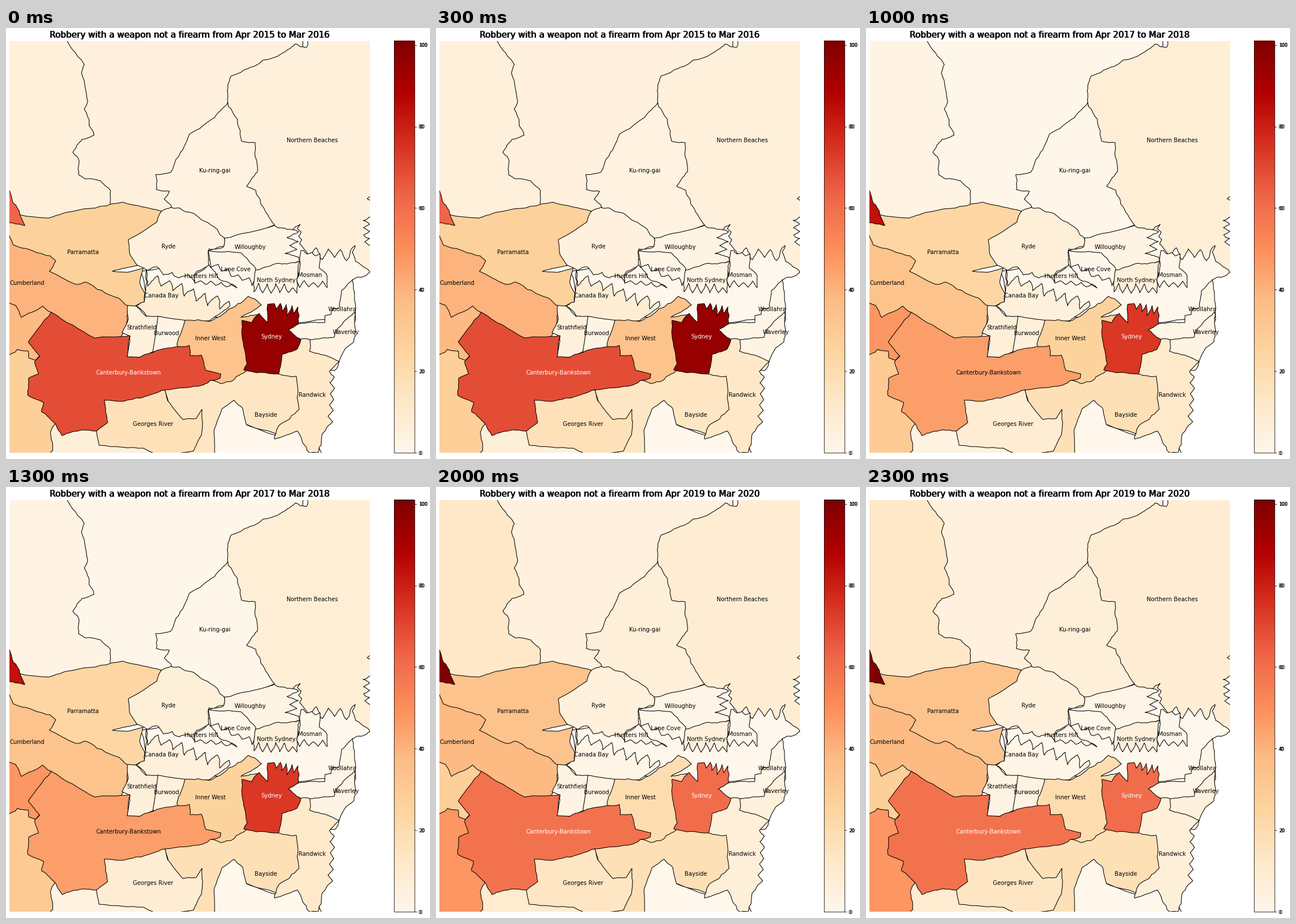
These frames come from a looping animation (742x755 px, 2500 ms). A matplotlib script:

```python
import matplotlib.pyplot as plt
import numpy as np
from matplotlib.animation import FuncAnimation
from matplotlib.patches import Polygon, Rectangle

W, H, DPI = 742, 755, 100
PX = 72 / DPI  # points per pixel
LEFT, TOP, RIGHT, BOTTOM = 6, 22.5, 637, 744
BAR_LEFT, BAR_RIGHT = 678.5, 714.5
VMAX = 101
CMAP = plt.get_cmap("OrRd")

plt.rcParams["font.family"] = "DejaVu Sans"
rng = np.random.default_rng(4)
fig = plt.figure(figsize=(W / DPI, H / DPI), dpi=DPI, facecolor="white")
ax = fig.add_axes([0, 0, 1, 1])
ax.axis("off")
map_box = Rectangle((LEFT, TOP), RIGHT - LEFT, BOTTOM - TOP, fc="none", ec="none")
ax.add_patch(map_box)
regions = []


def bays(start, end, count, depth):
    """Shoreline between two points, cut by inlets of random depth."""
    a, b = np.array(start, float), np.array(end, float)
    along = b - a
    across = np.array([-along[1], along[0]]) / np.hypot(*along)
    shore = []
    for k in range(2 * count + 1):
        inward = depth * (rng.uniform(0.6, 1) if k % 2 else rng.uniform(0, 0.2))
        shore.append(a + along * k / (2 * count) + across * inward)
    return shore


def roughen(points, amount, rounds=3):
    """Shift the midpoints of the sides again and again, as on a coast."""
    for _ in range(rounds):
        out = []
        for a, b in zip(points, np.roll(points, -1, axis=0)):
            out.append(a)
            length = np.hypot(*(b - a))
            if length > 6:
                shift = rng.normal(0, amount * min(length, 20), 2)
                out.append((a + b) / 2 + shift)
        points = np.array(out)
    return points


def region(values, outline, name=None, at=None, rough=0.06):
    """Add an area; later areas cover the loose edges of earlier ones."""
    points = roughen(np.array(outline, float), rough)
    patch = Polygon(points, ec="black", lw=1.05 * PX, joinstyle="round")
    ax.add_patch(patch)
    patch.set_clip_path(map_box)
    label = None
    if name:
        label = ax.text(at[0], at[1] + 1, name, size=10 * PX, ha="center", va="center")
    regions.append((values, patch, label))


EMPTY = (0,) * 5

# North
region((5, 3, 1, 6, 5), [(100, 10), (520, 10), (520, 330), (100, 330)])
region((6, 4, 3, 4, 13), [
    (100, 10), (137, 64), (132, 79), (143, 128), (137, 142), (154, 188), (133, 195),
    (117, 218), (128, 233), (127, 257), (166, 268), (183, 285), (185, 330), (0, 360),
    (0, 10)])
region((6, 5, 8, 14, 9), [
    (650, 10), (533, 10), (526, 34), (506, 28), (489, 41), (427, 69), (394, 84),
    (388, 103), (388, 131), (420, 330), (520, 395), (637, 428), (650, 381),
    *bays((637, 381), (637, 331), 4, -13), (650, 331), (650, 306), (632, 299),
    (650, 291)], "Northern Beaches", (535.5, 196))
region(EMPTY, [
    *bays((515, 344), (520, 384), 3, 6), *bays((522, 385), (606, 383), 4, 25),
    (611, 381), (606, 393), (612, 409), (637, 428), (606, 441), (604, 455),
    (580, 510), (480, 520), (300, 500), (250, 480), (236, 426), (400, 400),
    (480, 370)])
region((4, 1, 1, 9, 7), [
    (388, 131), (410, 180), (412, 198), (436, 201), (440, 252), (421, 277), (437, 284),
    (446, 309), (470, 345), (390, 380), (300, 335), (272, 330), (290, 314), (277, 300),
    (286, 286), (263, 283), (262, 257), (288, 253), (309, 214), (321, 186),
    (365, 157)], "Ku-ring-gai", (365, 249))

# Harbour
region((5, 3, 7, 7, 6), [
    (250, 335), (272, 321), (289, 314), (322, 323), (370, 353), (382, 368), (381, 383),
    (355, 387), (355, 415), (330, 432), *bays((330, 446), (248, 426), 3, 12),
    (230, 416), (200, 400), (200, 365)], "Ryde", (284, 382))
region((3, 2, 3, 3, 2), [
    (382, 368), (470, 346), (512, 357), *bays((513, 360), (513, 402), 3, 26),
    (514, 408), (430, 440), (362, 403), (354, 390), (381, 383)],
    "Willoughby", (427, 383))
region((2, 1, 1, 1, 1), [
    (354, 390), (412, 394), (437, 421), (436, 441), *bays((430, 452), (358, 420), 4, 12)],
    "Lane Cove", (402.5, 422))
region((1, 1, 1, 1, 1), [
    (355, 415), (376, 442), *bays((404, 456), (330, 448), 4, 8), (330, 434)],
    "Hunters Hill", (341, 434))
region((3, 2, 7, 3, 6), [
    (437, 424), (476, 412), (514, 408), (509, 440), *bays((509, 466), (434, 464), 5, 18),
    (433, 450)], "North Sydney", (473, 441))
region((2, 1, 1, 1, 1), [
    (514, 408), (516, 390), *bays((521, 388), (550, 395), 2, 10), (548, 420),
    (562, 434), *bays((562, 456), (514, 456), 3, 14), (509, 440)],
    "Mosman", (532, 432))
region((2, 1, 2, 1, 2), [
    (505, 521), (530, 516), *bays((545, 516), (583, 478), 3, 10), (587, 460),
    (606, 441), (610, 475), (612, 510), (590, 560), (520, 560), (492, 530)],
    "Woollahra", (589, 492))
region((3, 1, 3, 3, 6), [
    (532, 546), (574, 542), (589, 518), (610, 497), (612, 531), (609, 549), (595, 560),
    (583, 584), (575, 600), (520, 590)], "Waverley", (595, 532))

# West
region((7, 10, 4, 7, 10), [(40, 680), (350, 680), (350, 760), (40, 760)])
region((28, 22, 30, 28, 48), [
    (0, 576), (20, 563), (39, 566), (80, 566), (120, 660), (85, 694), (78, 712),
    (82, 740), (74, 750), (0, 760)])
region((38, 53, 48, 29, 28), [
    (0, 460), (100, 490), (100, 560), (58, 575), (52, 582), (40, 578), (39, 566),
    (20, 563), (0, 576)])
region((27, 36, 24, 34, 34), [
    (0, 335), (24, 327), (75, 333), (105, 323), (185, 308), (204, 305), (272, 321),
    (264, 340), (214, 371), (217, 397), (230, 416), (186, 426), (212, 428), (240, 421),
    (234, 445), (243, 466), (242, 480), (226, 487), (195, 495), (0, 400)],
    "Parramatta", (134.5, 392), 0.03)
region((63, 62, 84, 77, 101), [(0, 275), (13, 307), (33, 346), (0, 340)])
region((40, 36, 34, 34, 38), [
    (0, 356), (13, 380), (77, 399), (87, 408), (76, 426), (122, 449), (139, 445),
    (197, 473), (215, 487), (210, 528), (200, 543), (150, 550), (79, 498), (64, 487),
    (27, 507), (17, 486), (0, 480)], "Cumberland", (37, 446), 0.04)
region((9, 8, 6, 4, 2), [
    *bays((246, 424), (392, 474), 7, 26), (392, 486), (375, 500), (354, 513),
    (260, 520), (228, 487), (242, 480)], "Canada Bay", (272, 468))
region((6, 3, 7, 3, 3), [
    (213, 486), (228, 487), (245, 505), (266, 505), (275, 540), (257, 567), (234, 577),
    (212, 576), (217, 540), (203, 534), (214, 510)], "Strathfield", (238, 524), 0.03)
region((3, 2, 6, 5, 4), [
    (266, 505), (313, 512), (320, 540), (300, 570), (257, 567)],
    "Burwood", (281, 534), 0.02)

# South
region((14, 18, 18, 10, 18), [
    (278, 634), (335, 600), (418, 590), (508, 600), (530, 650), (500, 720), (400, 690),
    (385, 760), (310, 760), (330, 700), (300, 690)], "Bayside", (454.5, 677))
region(EMPTY, [
    (399, 652), (414, 666), (421, 695), (470, 713), (530, 700), (560, 760), (366, 760),
    (364, 705), (378, 667)], rough=0.02)
region((17, 6, 9, 13, 14), [
    (150, 680), (172, 640), (278, 634), (283, 653), (310, 686), (333, 684), (343, 668),
    (342, 713), (328, 741), (270, 750), (240, 736), (163, 731), (157, 703)],
    "Georges River", (257, 693), 0.03)
region((34, 24, 26, 22, 20), [
    (313, 512), (355, 514), (402, 487), (424, 470), (447, 485), (411, 507), (440, 502),
    (440, 560), (421, 600), (394, 619), (376, 623), (330, 605), (299, 554)],
    "Inner West", (358, 543))
region((69, 39, 46, 46, 59), [
    (79, 498), (155, 543), (217, 539), (212, 576), (234, 577), (275, 562), (321, 556),
    (322, 574), (342, 573), (349, 599), (376, 606), (375, 613), (346, 625), (278, 634),
    (237, 648), (203, 654), (172, 652), (178, 691), (158, 706), (134, 704), (98, 714),
    (85, 692), (62, 672), (66, 656), (38, 643), (40, 613), (57, 606), (50, 585),
    (59, 575), (39, 550)], "Canterbury-Bankstown", (214, 603), 0.04)
region((13, 27, 12, 11, 7), [
    (470, 570), (516, 545), (532, 546), (531, 566), (583, 584),
    *bays((577, 592), (574, 690), 5, 12), (553, 712), (546, 744), (531, 744),
    (510, 706), (470, 720), (478, 696), (513, 668), (508, 610), (477, 606)],
    "Randwick", (536, 642))
region((95, 72, 74, 77, 61), [
    (413, 512), (430, 516), (443, 500), (458, 516), (458, 484),
    *bays((470, 480), (511, 488), 4, 20), (512, 518), (494, 529), (516, 546),
    (509, 563), (483, 572), (477, 606), (416, 599), (422, 588), (413, 540)],
    "Sydney", (465, 540), 0.04)

# Colour bar
ax.imshow(np.linspace(1, 0, 256)[:, None], cmap=CMAP, aspect="auto",
          extent=(BAR_LEFT, BAR_RIGHT, BOTTOM, TOP), interpolation="nearest")
ax.add_patch(Rectangle((BAR_LEFT, TOP), BAR_RIGHT - BAR_LEFT, BOTTOM - TOP,
                       fc="none", ec="black", lw=0.8 * PX))
for tick in range(0, 101, 20):
    y = BOTTOM - tick / VMAX * (BOTTOM - TOP)
    ax.plot([BAR_RIGHT, BAR_RIGHT + 3.5], [y, y], color="black", lw=0.8 * PX)
    for dx in (0, 1):
        ax.text(BAR_RIGHT + 7.5 + dx, y, str(tick), size=8 * PX, va="center_baseline")
ax.set(xlim=(0, W), ylim=(H, 0))

# Doubled text gives the title its heavier look
titles = [ax.text(x, 17, "", size=15 * PX, ha="center") for x in (321, 321.9)]


def update(i):
    for values, patch, label in regions:
        patch.set_facecolor(CMAP(values[i] / VMAX))
        if label:
            label.set_color("white" if values[i] > 50 else "black")
    for title in titles:
        title.set_text("Robbery with a weapon not a firearm "
                       f"from Apr {2015 + i} to Mar {2016 + i}")
    return []


anim = FuncAnimation(fig, update, frames=5, interval=500, repeat=True,
                     repeat_delay=0, blit=False)
plt.show()
```
